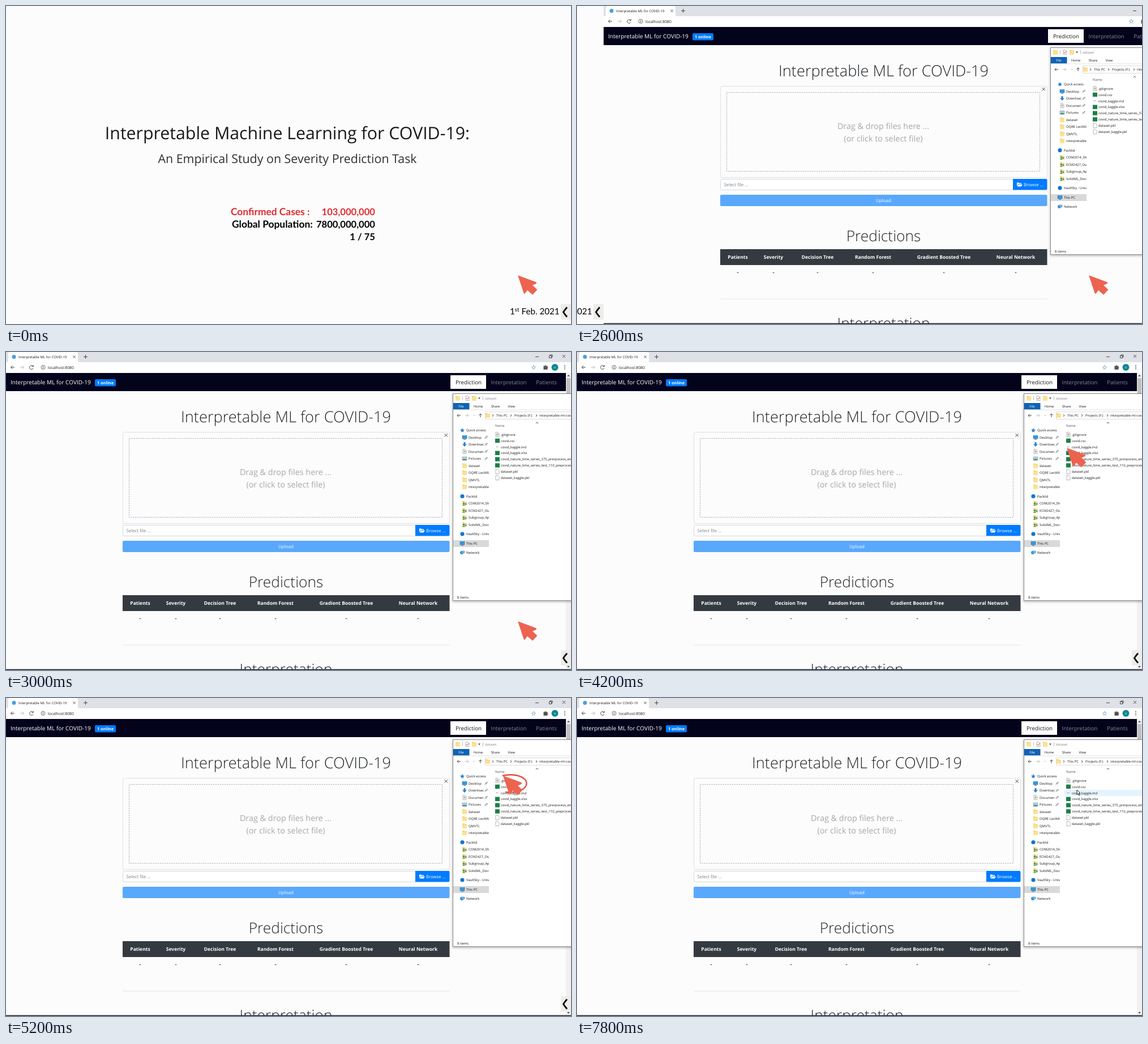
These frames come from a looping animation (998 by 561 pixels, 8 s). An HTML page:

```html
<!DOCTYPE html>
<html lang="en">
<head>
<meta charset="utf-8">
<title>Severity prediction demo</title>
<style>
html, body { margin: 0; width: 100%; height: 100%; overflow: hidden; background: #fcfcfc; }
svg { display: block; width: 100vw; height: 100vh; text-rendering: geometricPrecision; }
text { font-family: "Open Sans", "Noto Sans", sans-serif; fill: #1a1a1a; white-space: pre; }
.mid { text-anchor: middle; }
.end { text-anchor: end; }
.lato { font-family: Lato, sans-serif; font-weight: 700; fill: #000; }
.date { font-weight: 400; }
.h { font-weight: 300; font-size: 26.3px; fill: #212529; text-anchor: middle; }
.th { font-weight: 700; font-size: 8.5px; fill: #fff; text-anchor: middle; }
.s { font-size: 5.9px; }
.white { fill: #fff; }
.grey { fill: #85858f; }
.hint { font-size: 14.4px; fill: #a8a8a8; text-anchor: middle; }
.line { fill: none; stroke: #444; stroke-width: 1; }
.pale { stroke: #bbb; }

.strip, .arrow, .ink, .nav, .hover { animation: 8s step-end infinite; }
.strip { animation-name: push; }
.arrow { animation-name: point; }
.ink { animation-name: draw; fill: none; stroke: #ea4a3c; stroke-width: 2.4; stroke-dasharray: 100 200; }
.nav { animation-name: leave; }
.hover { animation-name: arrive; }

@keyframes push {
  0% { transform: translateX(0); }
  32.5% { transform: translateX(-951px); }
  35% { transform: translateX(-995px); }
  37.5%, 100% { transform: translateX(-998px); }
}
@keyframes point {
  0% { transform: translate(904px, 475px); }
  45% { transform: translate(906px, 338px); }
  47.5% { transform: translate(896px, 218px); }
  50% { transform: translate(868px, 183px); }
  52.5% { transform: translate(865px, 169px); }
  55% { transform: translate(859px, 158px); }
  57.5% { transform: translate(863px, 165px); }
  60% { transform: translate(897px, 165px); }
  62.5% { transform: translate(920px, 150px); }
  65% { transform: translate(878px, 137px); }
  67.5% { transform: translate(860px, 152px); }
  70% { transform: translate(862px, 158px); }
  72.5% { transform: translate(871px, 163px); }
  75% { transform: translate(886px, 166px); visibility: visible; }
  95%, 100% { transform: translate(886px, 166px); visibility: hidden; }
}
@keyframes draw {
  0% { stroke-dashoffset: 100; visibility: hidden; }
  60% { stroke-dashoffset: 90; visibility: visible; }
  62.5% { stroke-dashoffset: 71; visibility: visible; }
  65% { stroke-dashoffset: 38; visibility: visible; }
  67.5% { stroke-dashoffset: 21; visibility: visible; }
  70% { stroke-dashoffset: 15; visibility: visible; }
  72.5% { stroke-dashoffset: 8; visibility: visible; }
  75% { stroke-dashoffset: 0; visibility: visible; }
  95%, 100% { stroke-dashoffset: 0; visibility: hidden; }
}
@keyframes leave { 0% { visibility: visible; } 97.5%, 100% { visibility: hidden; } }
@keyframes arrive { 0% { visibility: hidden; } 97.5%, 100% { visibility: visible; } }
</style>
</head>
<body>
<svg viewBox="0 0 998 561" preserveAspectRatio="none">
<defs>
  <clipPath id="side"><rect x="789" y="120" width="64" height="300"/></clipPath>
  <filter id="shadow" x="-5%" y="-5%" width="110%" height="110%"><feDropShadow dx="0" dy="1.5" stdDeviation="2" flood-opacity=".3"/></filter>
  <g id="chevron">
    <rect x="980" y="526" width="18" height="27" fill="#ececea"/>
    <path d="M991 531.5Q987 536 984.5 540Q987 544 991 548.5" fill="none" stroke="#000" stroke-width="2.7"/>
  </g>
  <g id="folder"><path d="M-4-4h3.5l1 1h3.5v7h-8z" fill="#f6d272"/><path d="M-4-2h8v6h-8z" fill="#fbe192"/></g>
  <g id="shared"><use href="#folder"/><circle cx="-1.5" cy="0" r="1.7" fill="#3c9a4c"/><circle cx="2" cy="1" r="1.6" fill="#4386c5"/><path d="M-4 4q2.500-4 5 0z" fill="#3c9a4c"/></g>
  <g id="page"><path d="M-3-4h4l2 2v6h-6z" fill="#fff" stroke="#999" stroke-width=".7"/></g>
  <g id="lined"><use href="#page"/><path d="M-1.700-1.500h3.400M-1.700 0h3.400M-1.700 1.500h3.400" stroke="#777" stroke-width=".7"/></g>
  <g id="note"><path d="M-2.500 0h4" stroke="#999"/></g>
  <rect id="sheet" x="-4" y="-3.700" width="8" height="7.400" fill="#1d7f47"/>
  <path id="star" d="M0-4L1.200-1.200L4-1L1.800.9L2.500 3.700L0 2.200L-2.500 3.700L-1.800.9L-4-1L-1.200-1.200z" fill="#2e7fc9"/>
  <g id="screen"><rect x="-4" y="-3" width="8" height="5.500" fill="#2f9be0" stroke="#28608f" stroke-width=".5"/><path d="M-2 3.700h4" stroke="#557"/></g>
  <path id="down" d="M-1.500-4h3v3.500h2.500L0 4L-4-.5h2.500z" fill="#2f80cf"/>
  <g id="photo"><rect x="-4" y="-3" width="8" height="6" fill="#a9d3ef" stroke="#777" stroke-width=".5"/><path d="M-4 3l3-3 2 1.500 1-1 2 2.500z" fill="#4b8c5b"/></g>
  <circle id="dot" r="3.600" fill="#1575d1"/>
  <g id="net"><circle cx="-1" r="3" fill="#3f94d6"/><rect x="-1" y="-3" width="5" height="3.600" fill="#74bfe9" stroke="#2c6ea1" stroke-width=".5"/></g>
  <path id="pin" d="M-2.500 2.500L0 0M-1.500-.8L.8 1.500M0-.6L1.400-2.400L2.500-1.300L.7.100" class="line" style="stroke-width:.7"/>
</defs>

<g class="strip">
  <g id="title">
    <text class="mid" x="497" y="235" font-size="30.3" fill="#303030">Interpretable Machine Learning for COVID-19:</text>
    <text class="mid" x="497" y="276.500" font-size="21.400" style="fill:#303038">An Empirical Study on Severity Prediction Task</text>
    <g class="lato">
      <text class="lato" x="397" y="368.500" font-size="17.400" style="fill:#e02b2f">Confirmed Cases :</text>
      <text class="lato end" x="652" y="368.500" font-size="16.600" style="fill:#e02b2f">103,000,000</text>
      <text class="lato" x="399" y="391" font-size="17.400">Global Population:</text>
      <text class="lato end" x="652" y="391" font-size="16.600">7800,000,000</text>
      <text class="lato end" x="652" y="413" font-size="16.600">1 / 75</text>
    </g>
    <text class="lato date" x="890" y="543.500" font-size="15.200">1<tspan dy="-5" font-size="9.800">st</tspan><tspan dy="5"> Feb. 2021</tspan></text>
    <use href="#chevron"/>
  </g>

  <g transform="translate(998 0)">
    <!-- browser frame -->
    <rect width="998" height="561" fill="#fcfcfc"/>
    <rect width="998" height="18" fill="#dee1e6"/>
    <path d="M2 18Q4 18 4 15V3Q4 0 7 0H124Q127 0 127 3V15Q127 18 129 18z" fill="#fff"/>
    <circle cx="14" cy="8.500" r="3.500" fill="#4a9fdc"/>
    <text x="22" y="11" font-size="6.050">Interpretable ML for COVID-19</text>
    <path class="line" d="M118.500 6.500l4 4m0-4l-4 4M137 8.500h7m-3.500-3.500v7M935 8.500h6M959.500 6.500h4v4h-4zM961 6.500v-1.500h4v4h-1.500M983 5l5 5m0-5l-5 5"/>
    <rect y="18" width="998" height="19" fill="#fff"/>
    <path class="line" d="M15 27H8.500m3-3l-3 3 3 3M47.500 25a3.300 3.300 0 1 0 .5 3.500M48.300 23v2.600h-2.600"/>
    <path class="line pale" d="M25 27h6.500m-3-3l3 3-3 3"/>
    <g class="line"><circle cx="65.500" cy="27" r="3.500" stroke-width=".8"/><path d="M65.500 26.500v2.500m0-4v1"/></g>
    <text x="74" y="29.500" font-size="6.800">localhost:8080</text>
    <use href="#star" x="932" y="27" style="stroke:none"/>
    <path d="M932 24.300l.9 2 2 .1-1.600 1.400.6 2-1.900-1.100-1.900 1.100.6-2-1.600-1.400 2-.1z" fill="#fff"/>
    <path d="M949.500 24.500h2.500q1-3 2 0h2.500v2.300q2 .7 0 2v2.200h-7z" fill="#555"/>
    <circle cx="969.500" cy="27" r="6" fill="#0d8794"/>
    <text class="mid white" x="969.500" y="29" font-size="4.500">tt</text>
    <path d="M987 23v1.500m0 1.500v1.500m0 1.500v1.500" stroke="#444" stroke-width="1.500"/>

    <!-- site header -->
    <rect y="37" width="989" height="32" fill="#03031c"/>
    <text class="white" x="8" y="57" font-size="10.050">Interpretable ML for COVID-19</text>
    <rect x="157" y="48" width="37" height="12.500" rx="2" fill="#007bff"/>
    <text class="mid white" x="175.500" y="57" font-size="7.300" font-weight="700">1 online</text>
    <rect x="785" y="41" width="63" height="24" fill="#fff"/>
    <text class="mid" x="817" y="57" font-size="9.800">Prediction</text>
    <text class="mid grey" x="888" y="57" font-size="9.700">Interpretation</text>
    <text class="mid grey" x="954.500" y="57" font-size="9.700">Patients</text>
    <rect x="989" y="37" width="9" height="522" fill="#f1f1f1"/>
    <rect x="990" y="46" width="7" height="120" fill="#c1c1c1"/>
    <path d="M991 43l2.500-3 2.500 3zM991 554l2.500 3 2.500-3z" fill="#555"/>

    <!-- upload form -->
    <text class="h" x="494.500" y="123.500" style="font-size:27.200px">Interpretable ML for COVID-19</text>
    <rect x="206.500" y="141.500" width="577" height="161" rx="2" fill="none" stroke="#e0e0e0"/>
    <path class="line" d="M774.500 144l5.500 5.500m0-5.500l-5.500 5.500"/>
    <rect x="217.500" y="152.500" width="553" height="139" fill="none" stroke="#b0b4c2" stroke-dasharray="2.500 1.500"/>
    <text class="hint" x="494" y="217">Drag &amp; drop files here ...</text>
    <text class="hint" x="494" y="239">(or click to select file)</text>
    <rect x="206.500" y="305.500" width="517" height="19" rx="2" fill="#fff" stroke="#d2d7dc"/>
    <text x="212.500" y="318" font-size="7.850" style="fill:#7c8288">Select file ...</text>
    <path d="M723 305h58.500q2 0 2 2v15.500q0 2-2 2H723z" fill="#007bff"/>
    <path d="M730 318v-6.500h3l1 1h4v1.500h-5.500zM730.800 318.500l2-3.800h7l-2 3.800z" fill="#fff"/>
    <text class="white" x="742" y="318" font-size="7.750">Browse ...</text>
    <rect x="206" y="333" width="577.500" height="20" rx="2" fill="#59a8fd"/>
    <text class="mid white" x="494.500" y="346" font-size="8">Upload</text>

    <!-- results -->
    <text class="h" x="494.500" y="414.500">Predictions</text>
    <rect x="206" y="429" width="577.500" height="28" fill="#343a40"/>
    <g id="heads"></g>
    <path d="M206 517h577.500" stroke="#e4e4e4"/>
    <text class="h" x="494.500" y="569">Interpretation</text>
    <rect y="559.500" width="998" height="1.500" fill="#252b36"/>

    <!-- file window -->
    <rect x="789.500" y="73.500" width="230" height="365" fill="#fff" stroke="#8b8b8b" filter="url(#shadow)"/>
    <use href="#folder" x="798" y="81.500"/><use href="#page" x="815" y="81.500"/><use href="#folder" x="827" y="81.500"/>
    <path d="M813 81.500l1.500 2 3-4" class="line" style="stroke:#d04a3c"/>
    <path d="M806.500 78v7M842.500 78v7" class="line pale"/>
    <path d="M834 80.500h4l-2 2.500z" fill="#333"/>
    <text class="s grey" x="846" y="83.500">dataset</text>
    <rect x="790" y="90" width="28.500" height="11.500" fill="#1062b4"/>
    <g class="mid">
      <text class="s white" x="804" y="98">File</text><text class="s" x="834" y="98">Home</text>
      <text class="s" x="864.500" y="98">Share</text><text class="s" x="893" y="98">View</text>
    </g>
    <path d="M790 102h208" stroke="#e2e2e2"/>
    <path class="line" d="M803 112h-6m2.500-2.500l-2.500 2.500 2.500 2.500M838 115v-6m-2.500 2.500l2.500-2.500 2.500 2.500"/>
    <path class="line pale" d="M811 112h6m-2.500-2.500l2.500 2.500-2.500 2.500M825.500 111l1.500 1.500 1.500-1.500"/>
    <path d="M1010 105.500H846.500v13H1010" fill="none" stroke="#dcdcdc"/>
    <use href="#folder" x="851" y="112"/>
    <path class="line" stroke-width=".8" d="M859 110l2 2-2 2M891 110l2 2-2 2M936 110l2 2-2 2"/>
    <text class="s" x="866" y="114">This PC</text><text class="s" x="898" y="114">Projects (F:)</text><text class="s" x="942" y="114">interpretable-ml-covid</text>
    <text class="s" x="864" y="132" style="fill:#44546a">Name</text>
    <path class="line" d="M936 126l2-2 2 2" stroke-width=".7"/>
    <rect x="790" y="332" width="63" height="12" fill="#d9d9d9"/>
    <g id="places" clip-path="url(#side)"></g>
    <rect class="hover" x="861" y="162" width="137" height="11" fill="#e5f3ff"/>
    <g id="files"></g>
    <text class="s" x="797" y="434.500">8 items</text>
    <use class="nav" href="#chevron"/>
  </g>
</g>

<path class="ink" pathLength="100" d="M882 166C901 168 920 162 919.500 150C919 141 905 135 890 135.500C873 136 860 142 860 151C860 161 874 167 887 166"/>
<path class="arrow" d="M1 1L32 12.500Q33 13.500 32 14.500L25 17.500L33.500 25.500L26 33.500L17 25.500L12.500 31.500Q11.500 32.500 11 31z" fill="#ec6350" stroke="#ec6350" stroke-width="1.200" stroke-linejoin="round"/>
<path class="hover" d="M883 162v8.500l2-1.700 1.400 3 1.500-.7-1.400-2.900h2.600z" fill="#fff" stroke="#111" stroke-width=".9"/>
</svg>
<script>
const fill = (id, parts) => { document.getElementById(id).innerHTML = parts.join(''); };
const label = (x, y, s, cls) => `<text x="${x}" y="${y}" class="${cls}">${s}</text>`;
const icon = (name, x, y) => `<use href="#${name}" x="${x}" y="${y}"/>`;

const heads = [['Patients', 237], ['Severity', 300], ['Decision Tree', 378], ['Random Forest', 476],
  ['Gradient Boosted Tree', 601], ['Neural Network', 728]];
fill('heads', heads.map(([s, x]) => label(x, 446, s, 'th') +
  `<path d="M${x - 1.3} 470.500h2.600" stroke="#333"/>`));

const files = [['lined', '.gitignore'], ['sheet', 'covid.csv'], ['note', 'covid_kaggle.md'], ['sheet', 'covid_kaggle.xlsx'],
  ['sheet', 'covid_nature_time_series_375_prerpocess_en.csv'], ['sheet', 'covid_nature_time_series_test_110_preprocess_en.csv'],
  ['page', 'dataset.pkl'], ['page', 'dataset_kaggle.pkl']];
fill('files', files.map(([kind, s], i) => {
  const y = 145.5 + i * 10.9;
  return icon(kind, 868, y) + label(874, y + 2.2, s, 's');
}));

// Each group: first row's y, indent, then [icon, text, pinned]
const groups = [
  [138, 0, ['star', 'Quick access']],
  [150.5, 4, ['screen', 'Desktop', 1], ['down', 'Downloac', 1], ['lined', 'Documen', 1], ['photo', 'Pictures', 1],
    ['folder', 'dataset'], ['folder', 'OQRE LectML'], ['folder', 'QMVTL'], ['folder', 'interpretable']],
  [254.5, 0, ['dot', 'Packlid']],
  [267, 4, ['shared', 'COM2014_Sha'], ['shared', 'ECM2427_Out'], ['shared', 'Subgroup_App'], ['shared', 'SolidML_Docs']],
  [321, 0, ['dot', 'VaultSky - Univ']],
  [337.5, 0, ['screen', 'This PC']],
  [354, 0, ['net', 'Network']]
];
fill('places', groups.flatMap(([top, dx, ...rows]) => rows.map(([kind, s, pinned], i) => {
  const y = top + i * 12.5;
  return icon(kind, 806 + dx, y) + label(813 + dx, y + 2.2, s, 's') + (pinned ? icon('pin', 848, y) : '');
})));
</script>
</body>
</html>
```
